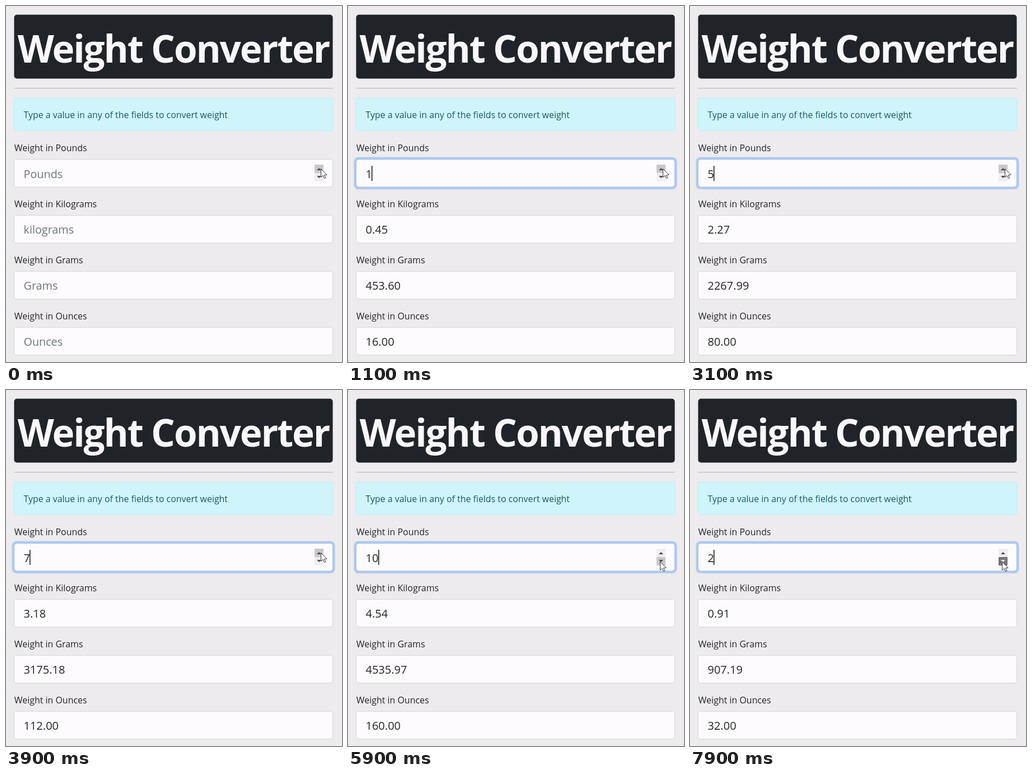
Write an HTML page with a canvas that moves like this. It is 600 px wide and 635 px high and loops after 8000 ms.

```html
<!DOCTYPE html>
<html lang="en">
<head>
<meta charset="utf-8">
<title>Weight Converter</title>
<style>
html, body { margin: 0; width: 100%; height: 100%; overflow: hidden; background: #edebed; }
canvas { display: block; width: 600px; height: 635px; }
</style>
</head>
<body>
<canvas id="stage"></canvas>
<script>
const W = 600, H = 635, LOOP = 8000, STEP = 100;
const FONT = '"Open Sans", "Noto Sans", sans-serif';
const canvas = document.getElementById('stage');
const ctx = canvas.getContext('2d');
const dpr = window.devicePixelRatio || 1;
canvas.width = W * dpr;
canvas.height = H * dpr;

const fields = [
  { label: 'Weight in Pounds', hint: 'Pounds', show: p => String(p) },
  { label: 'Weight in Kilograms', hint: 'kilograms', show: p => (p / 2.2046).toFixed(2) },
  { label: 'Weight in Grams', hint: 'Grams', show: p => (p / 0.0022046).toFixed(2) },
  { label: 'Weight in Ounces', hint: 'Ounces', show: p => (p * 16).toFixed(2) }
];

// Single clicks up, then one long press down with auto-repeat and a last click.
const clicks = [700, 1400, 1900, 2300, 2800, 3300, 3700, 4100, 4400, 4700];
const CLICK = 200, HOLD = 6300, HOLD_END = 7400, LAST = 7700;
const repeats = [HOLD];
for (let t = HOLD + 500; t < HOLD_END; t += 100) repeats.push(t);
const drops = [...repeats, LAST];

function stateAt(t) {
  const ups = clicks.filter(c => c <= t);
  const downs = drops.filter(d => d <= t);
  const k = Math.min(1, Math.max(0, (t - 5300) / 500));
  const ease = k * k * (3 - 2 * k);
  const x = 562 - 5 * ease, y = 290 + 16 * ease;
  return {
    pounds: ups.length - downs.length,
    changed: Math.max(0, ...ups, ...downs),
    pressed: ups.some(c => t < c + CLICK) || (t >= HOLD && t < HOLD_END) || t >= LAST,
    x, y,
    over: y < 298 ? 0 : 1
  };
}

function box(x, y, w, h, r, fill, stroke) {
  ctx.beginPath();
  ctx.roundRect(x, y, w, h, r);
  ctx.fillStyle = fill;
  ctx.fill();
  if (stroke) {
    ctx.strokeStyle = stroke;
    ctx.lineWidth = 1;
    ctx.stroke();
  }
}

function text(str, x, y, size, color, weight = 400) {
  ctx.font = `${weight} ${size}px ${FONT}`;
  ctx.fillStyle = color;
  ctx.fillText(str, x, y);
}

function polygon(points, fill, stroke) {
  ctx.beginPath();
  points.forEach(([x, y]) => ctx.lineTo(x, y));
  ctx.closePath();
  ctx.fillStyle = fill;
  ctx.fill();
  if (stroke) {
    ctx.strokeStyle = stroke;
    ctx.lineWidth = 1;
    ctx.stroke();
  }
}

function spinner(s) {
  for (let i = 0; i < 2; i++) {
    const hot = s.over === i, down = hot && s.pressed;
    ctx.fillStyle = down ? '#767477' : hot ? '#c9c7c9' : '#f0eef0';
    ctx.fillRect(551, 283 + i * 15, 16, 15);
    const mid = i ? 305 : 291, d = i ? 2 : -2;
    polygon([[555, mid - d], [563, mid - d], [559, mid + d]], down ? '#fdfbfe' : '#4c4b4d');
  }
}

function pointer(x, y) {
  const shape = [[0, 0], [0, 15], [3.5, 11.8], [6, 17], [8.3, 16], [5.9, 11], [10.6, 10.6]];
  ctx.lineJoin = 'round';
  polygon(shape.map(([a, b]) => [x + 0.5 + a, y + 0.5 + b]), '#fdfbfe', '#3b3a3e');
}

function field(f, i, s, t) {
  const y = 273.5 + i * 99.9;
  const focus = i === 0 && s.pounds > 0;
  text(f.label, 14.8, y - 14.5, 15.95, '#212529');
  if (focus) box(10.5, y - 4, 577, 57.5, 8, '#b3caee');
  box(14.5, y, 569, 49.5, 5, '#fdfbfe', focus ? '#98bbec' : '#d5d5db');
  const value = s.pounds ? f.show(s.pounds) : f.hint;
  text(value, 31.5, y + 33, s.pounds ? 20 : 19.8, s.pounds ? '#212529' : '#6c757d');
  if (focus && (t - s.changed) % 1000 < 500) {
    const x = Math.floor(31.5 + ctx.measureText(value).width);
    ctx.fillStyle = '#212529';
    ctx.fillRect(x, y + 11.5, 1.6, 27);
  }
}

function draw(t) {
  const s = stateAt(t);
  ctx.setTransform(dpr, 0, 0, dpr, 0, 0);
  ctx.fillStyle = '#edebed';
  ctx.fillRect(0, 0, W, H);

  box(14.5, 15.5, 569, 114, 5, '#202428');
  ctx.textAlign = 'center';
  ctx.letterSpacing = '-2.1px';
  text('Weight Converter', 299, 101, 67.3, '#f9f7fa', 700);
  ctx.letterSpacing = '0px';
  ctx.textAlign = 'left';
  ctx.fillStyle = '#bfbdbf';
  ctx.fillRect(14.5, 146, 569.5, 1.2);

  box(14.5, 164, 569, 58.5, 4, '#cff4f9', '#bcebf3');
  text('Type a value in any of the fields to convert weight', 31.5, 200, 15.9, '#1c5865');

  fields.forEach((f, i) => field(f, i, s, t));
  spinner(s);
  pointer(s.x, s.y);
}

const start = performance.now();
function tick() {
  const t = (performance.now() - start) % LOOP;
  draw(Math.floor(t / STEP) * STEP);
  requestAnimationFrame(tick);
}
tick();
</script>
</body>
</html>
```
